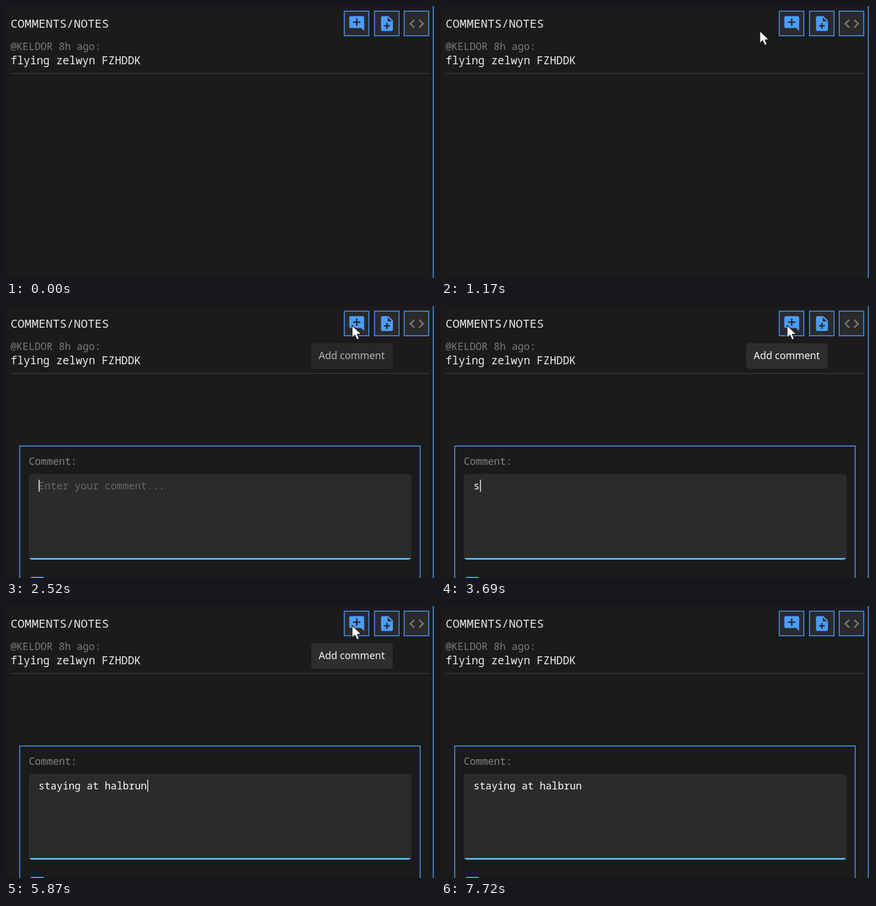
These frames come from a looping animation (752x476 px, 8000 ms). An HTML page:

```html
<!DOCTYPE html>
<html lang="en">
<head>
<meta charset="utf-8">
<title>Comments and notes</title>
<style>
html, body { margin: 0; width: 100%; height: 100%; overflow: hidden; background: #1b1b1b; }
svg { display: block; width: 100vw; height: 100vh; }
text { font-family: "Noto Sans Mono", "DejaVu Sans Mono", monospace; font-size: 17.58px; white-space: pre; }
.frame { fill: none; stroke: #3f7dc8; stroke-width: 2; }
.button { fill: #2a2a2a; }
.icon { fill: #4a9eff; }
.muted { fill: #7a7a7a; }
.label { fill: #858585; }
</style>
</head>
<body>
<svg viewBox="0 0 752 476">
  <defs>
    <clipPath id="field"><rect x="40" y="294" width="671" height="150" rx="6"/></clipPath>
  </defs>
  <rect width="752" height="476" fill="#1b1b1b"/>
  <rect x="748" width="2" height="476" fill="#3f7dc8"/>

  <text x="8" y="38" fill="#e8e8e8" style="font-size:20.5px">COMMENTS/NOTES</text>
  <text x="8" y="77" class="muted">@KELDOR 8h ago:</text>
  <text x="8" y="102" fill="#ececec" style="font-size:19.05px">flying zelwyn FZHDDK</text>
  <rect x="8" y="117" width="734" height="2" fill="#303030"/>

  <rect class="frame button" x="593" y="9" width="43" height="43"/>
  <rect class="frame button" x="646" y="9" width="43" height="43"/>
  <rect class="frame button" x="698" y="9" width="43" height="43"/>
  <path class="icon" transform="translate(599.2 15.2) scale(1.3)" d="M22 4c0-1.1-.9-2-2-2H4c-1.1 0-2 .9-2 2v12c0 1.1.9 2 2 2h14l4 4zM17 11h-4v4h-2v-4H7V9h4V5h2v4h4z"/>
  <path class="icon" transform="translate(652.2 15.2) scale(1.3)" d="M14 2H6c-1.1 0-2 .9-2 2v16c0 1.1.9 2 2 2h12c1.1 0 2-.9 2-2V8zM16 16h-3v3h-2v-3H8v-2h3v-3h2v3h3zM13 9V3.5L18.5 9z"/>
  <path class="muted" transform="translate(704.4 15.4) scale(1.3)" d="M9.4 16.6L4.8 12l4.6-4.6L8 6l-6 6 6 6zM14.6 16.6l4.6-4.6-4.6-4.6L16 6l6 6-6 6z"/>

  <g id="form">
    <rect class="frame" x="24" y="245" width="702" height="300"/>
    <text x="40" y="278" class="label">Comment:</text>
    <g clip-path="url(#field)">
      <rect x="40" y="294" width="671" height="150" fill="#2a2b2b"/>
      <rect x="40" y="441" width="671" height="3" fill="#58b8ee"/>
    </g>
    <text id="hint" x="57" y="321" fill="#686868">Enter your comment...</text>
    <text id="entry" x="57" y="321" fill="#fff" font-weight="500"></text>
    <rect id="caret" y="304" width="1.6" height="21" fill="#e8e8e8"/>
    <rect x="41" y="475" width="28" height="28" rx="6" fill="#222" stroke="#4a9eff" stroke-width="2"/>
  </g>

  <g id="tip">
    <rect x="535" y="65" width="143" height="45" rx="5" fill="#2d2d2d"/>
    <text x="548" y="93" fill="#f4f4f4" style="font-family:'Noto Sans','Open Sans',sans-serif;font-size:17.5px">Add comment</text>
  </g>
  <path id="cursor" fill="#fff" stroke="#111" stroke-width="1.2" stroke-linejoin="round" d="M.7 .8V22.6L5.7 17.9L9.2 26L13.2 24.2L9.8 16.4H16.9Z"/>
</svg>
<script>
const LOOP = 8000, TICK = 170, ADVANCE = 10.55;
const NOTE = "staying at halbrun";
// [time, characters typed]
const KEYS = [[3690, 1], [3850, 3], [4020, 4], [4350, 6], [4520, 8], [4690, 10],
  [4860, 11], [5030, 12], [5360, 14], [5530, 15], [5700, 17], [5870, 18]];

const [form, hint, entry, caret, tip, cursor] =
  ["form", "hint", "entry", "caret", "tip", "cursor"].map(id => document.getElementById(id));
const show = (el, on) => el.setAttribute("visibility", on ? "inherit" : "hidden");
const ticks = (t, start, max) =>
  Math.max(0, Math.min(max, Math.floor((t - start) / TICK) + 1));

function pointer(t) {
  const leave = ticks(t, 7040, 5) / 4;
  if (leave) return [606 + 82 * leave ** 1.5, 33 + 417 * leave ** 2];
  const rest = 1 - ticks(t, 830, 7) / 7;
  return [606 - 238 * rest ** 2.87, 33 + 30 * rest ** 2];
}

function draw(t) {
  const typed = KEYS.reduce((n, [at, count]) => t >= at ? count : n, 0);
  show(form, t >= 2520);
  show(hint, t >= 2520 && !typed);
  entry.textContent = NOTE.slice(0, typed);
  caret.setAttribute("x", 57.2 + typed * ADVANCE + (typed ? 0.6 : 0));
  show(caret, t >= 2520 && t < 7550);

  show(tip, t >= 2520 && t < 7210);
  tip.setAttribute("opacity", t < 2680 ? 0.7 : 1);

  const [x, y] = pointer(t);
  cursor.setAttribute("transform", `translate(${x.toFixed(1)} ${y.toFixed(1)})`);
  show(cursor, t >= 500 && t < 7720);
}

const start = performance.now();
function loop() {
  draw((performance.now() - start) % LOOP);
  requestAnimationFrame(loop);
}
loop();
</script>
</body>
</html>
```
